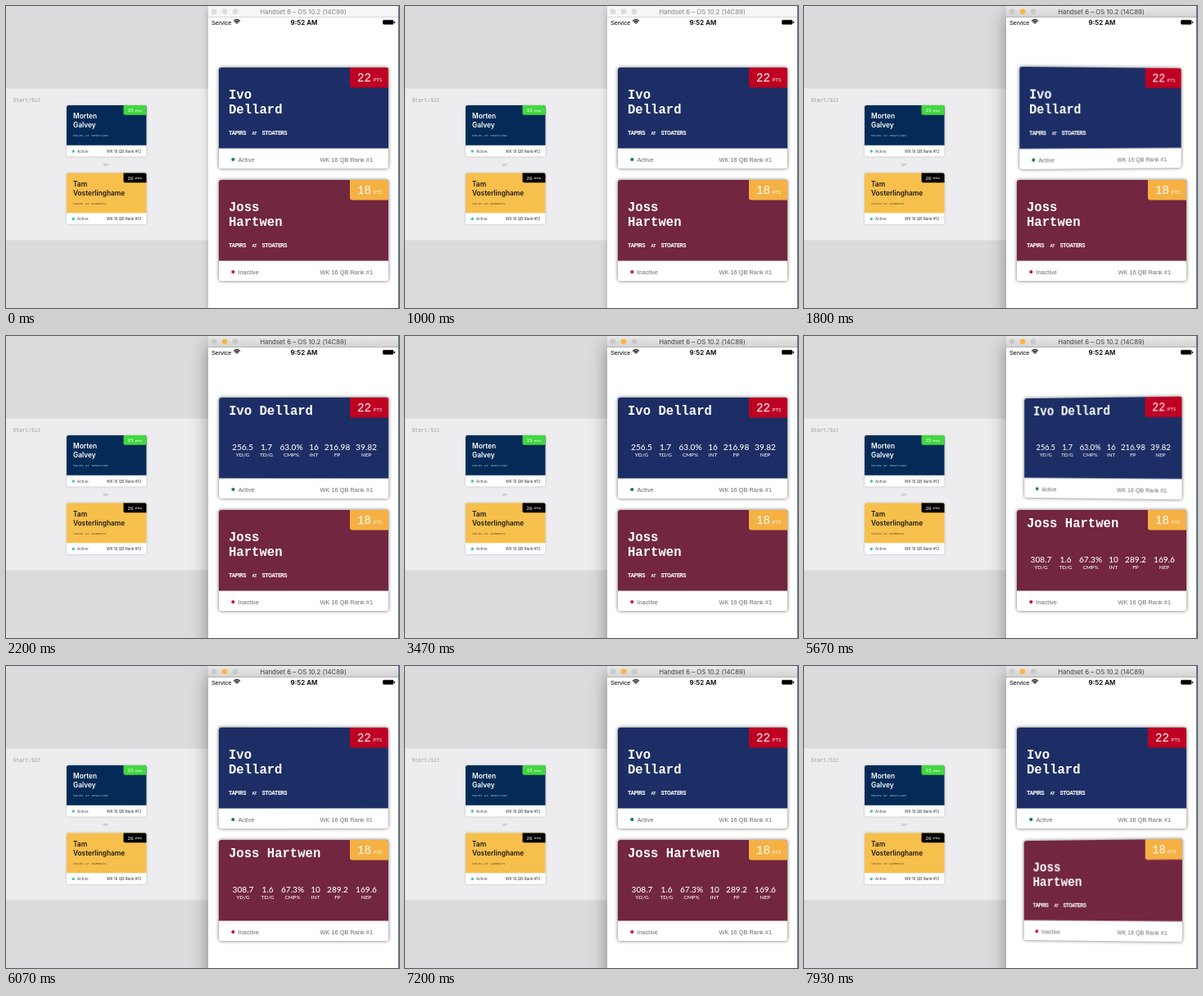
An HTML page that plays this animation: 480 by 368 pixels, repeating every 8 s.

```html
<!DOCTYPE html>
<html lang="en">
<head>
<meta charset="utf-8">
<title>Flipping player cards</title>
<style>
  html, body { margin: 0; width: 100%; height: 100%; overflow: hidden; background: #dbdadc; }
  #stage { position: absolute; left: 0; top: 0; width: 480px; height: 368px; overflow: hidden; }
  svg { position: absolute; left: 0; top: 0; display: block; overflow: visible; }
  text { white-space: pre; }
  .card { left: 259.6px; filter: drop-shadow(0 .8px 2px rgba(0, 0, 0, .6)); }
  .mini { filter: drop-shadow(0 .6px 1px rgba(0, 0, 0, .25)); }
  .mono { font-family: "Liberation Mono", monospace; }
  .sans { font-family: "Liberation Sans", sans-serif; }
  .lato { font-family: Lato, sans-serif; }
  .inter { font-family: Inter, sans-serif; }
  .match { font-family: Roboto, sans-serif; font-weight: 700; letter-spacing: -.5px; }
  #phone { position: absolute; left: 247px; top: 0; width: 232px; height: 380px; background: #fff; }
  #phone { box-shadow: 0 4px 9px rgba(0, 0, 0, .22); }
  #phone.active { box-shadow: 0 10px 20px rgba(0, 0, 0, .4); }
  #bar { height: 13px; background: #f6f6f6; border-bottom: 1px solid #d8d8d8; }
  .active #bar { background: linear-gradient(#e9e9e9, #d3d3d3); border-color: #b4b4b4; }
  .button { fill: #dcdcdc; }
  .active .button { fill: #cbcacb; }
  .active .minimize { fill: #fdb53e; }
  #title { fill: #858585; }
  .active #title { fill: #424242; }
</style>
</head>
<body>
<div id="stage"></div>
<script>
const LOOP = 8000, FOCUS_AT = 1690;
const stage = document.getElementById('stage');

const text = (x, y, size, fill, cls, str, extra = '') =>
  `<text x="${x}" y="${y}" font-size="${size}" fill="${fill}" class="${cls}" ${extra}>${str}</text>`;
const rect = (x, y, w, h, fill, r = 0) =>
  `<rect x="${x}" y="${y}" width="${w}" height="${h}" rx="${r}" fill="${fill}"/>`;
const dot = (x, y, r, fill, cls = '') =>
  `<circle cx="${x}" cy="${y}" r="${r}" fill="${fill}" class="${cls}"/>`;
const middle = 'text-anchor="middle"', end = 'text-anchor="end"';
const weight = w => `font-weight="${w}"`;

// Body with rounded top corners, and a badge in its top right corner
const roundTop = (w, h, r, fill) =>
  `<path fill="${fill}" d="M0 ${h}V${r}Q0 0 ${r} 0H${w - r}Q${w} 0 ${w} ${r}V${h}Z"/>`;
const corner = (right, w, h, r, fill) =>
  `<path fill="${fill}" d="M${right - w} 0H${right - r}Q${right} 0 ${right} ${r}V${h}H${right - w + r}Q${right - w} ${h} ${right - w} ${h - r}Z"/>`;

function miniCard(y, c) {
  return `<g class="mini" transform="translate(74 ${y})">` +
    rect(0, 0, 97.5, 62.5, '#fff', 2.5) + roundTop(97.5, 48.7, 2.5, c.color) +
    corner(97.5, 28, 11.7, 2, c.badge) +
    text(74.5, 8, 5.9, '#fff', 'mono', c.points) +
    text(84, 7.8, 4.3, '#fff', 'mono', 'PTS', weight(700)) +
    c.name.map((n, i) => text(8, 16.2 + i * 11.2, 8.3, c.ink, 'inter', n, weight(600))).join('') +
    text(8, 38, 4.2, c.ink, 'mono', c.match, 'opacity=".65"') +
    dot(8.3, 56, 1.7, '#3fc9a4') +
    text(13, 57.6, 4.6, '#444', 'inter', 'Active') +
    text(91.3, 57.6, 4.6, '#333', 'inter', 'WK 16 QB Rank #12', end) + '</g>';
}

const board = `<svg width="247" height="368">` +
  rect(0, 0, 247, 368, '#dbdadc') + rect(0, 100.5, 247, 185, '#edecee') +
  text(8.5, 117, 6.3, '#b5b4b7', 'mono', 'Start/Sit', weight(700)) +
  miniCard(121, { color: '#042b57', badge: '#42d840', ink: '#fff', points: 15,
    name: ['Morten', 'Galvey'], match: 'MOLES AT NEWTLING' }) +
  text(119, 195, 5.8, '#99989b', 'mono', 'or') +
  miniCard(203.5, { color: '#f7bf4c', badge: '#000', ink: '#1d1a14', points: 20,
    name: ['Tam', 'Vosterlinghame'], match: 'VOLES AT WOMBATS' }) + '</svg>';

const wifi = [1.4, 3.3, 5.2].map(r =>
  `<path d="M${-r * .75} ${-r * .75}A${r * 1.06} ${r * 1.06} 0 0 1 ${r * .75} ${-r * .75}" fill="none" stroke="#000" stroke-width="1.2"/>`).join('');

const phone = `<div id="phone"><div id="bar"></div><svg width="232" height="30">` +
  dot(7, 6.8, 3.3, '', 'button') + dot(20, 6.8, 3.3, '', 'button minimize') + dot(33, 6.8, 3.3, '', 'button') +
  `<text id="title" x="116" y="9.8" font-size="7.8" class="inter" ${middle}>Handset 6 – OS 10.2 (14C89)</text>` +
  text(4, 22.6, 7.3, '#000', 'sans', 'Service') +
  `<g transform="translate(35 22.2)">${wifi}</g>` +
  text(117, 22.8, 8, '#000', 'inter', '9:52 AM', `${middle} ${weight(600)}`) +
  `<rect x="213.5" y="17.3" width="12.6" height="5" rx="1" stroke="#000" stroke-width=".6"/>` +
  rect(227, 18.7, 1.1, 2.2, '#000', .5) + rect(232, 0, 1, 368, '#5b7a94') + '</svg></div>';

const labels = ['YD/G', 'TD/G', 'CMP%', 'INT', 'FP', 'NEP'];
const cards = [
  { y: 75, color: '#1c2e65', badge: '#be0023', points: 22, first: 'Ivo', last: 'Dellard',
    status: 'Active', light: '#0f7d3b', opens: 1769, closes: 5635,
    stats: ['256.5', '1.7', '63.0%', '16', '216.98', '39.82'], columns: [29, 58, 88.5, 116, 144.5, 180] },
  { y: 212, color: '#722640', badge: '#f6b144', points: 18, first: 'Joss', last: 'Hartwen',
    status: 'Inactive', light: '#c8102e', opens: 3730, closes: 7723,
    stats: ['308.7', '1.6', '67.3%', '10', '289.2', '169.6'], columns: [29.5, 59.5, 90, 118, 145, 180] },
];

function cardMarkup(c) {
  const name = (y, str) => text(12, y, 15.6, '#fff', 'mono', str, weight(700));
  const front = name(38, c.first) + name(56, c.last) +
    text(12, 81.8, 7, '#fff', 'match', 'TAPIRS') +
    text(40.5, 81.8, 5.2, '#fff', 'match', 'AT') +
    text(52.5, 81.8, 7, '#fff', 'match', 'STOATERS');
  const back = name(20.6, `${c.first} ${c.last}`) + c.columns.map((x, i) =>
    text(x, 63.8, 10.1, '#fff', 'lato', c.stats[i], `${middle} ${weight(500)}`) +
    text(x, 72.1, 6.4, '#fff', 'lato', labels[i], `${middle} ${weight(500)}`)).join('');
  return `<svg class="card" style="top:${c.y}px" width="207" height="123">` +
    rect(0, 0, 207, 123, '#fff', 3) + roundTop(207, 98.5, 3, c.color) +
    corner(207, 47, 24.5, 3, c.badge) +
    text(169, 17, 14.2, '#fff', 'mono', c.points) +
    text(188.5, 17, 6.4, '#fff', 'lato', 'PTS', 'opacity=".9"') +
    `<g class="front">${front}</g><g class="back">${back}</g>` +
    dot(17.3, 112, 2.1, c.light) +
    text(23.4, 114.7, 7.4, '#6b6b6b', 'sans', c.status) +
    text(188, 114.7, 7.4, '#6b6b6b', 'sans', 'WK 16 QB Rank #1', end) + '</svg>';
}

stage.innerHTML = board + phone + cards.map(cardMarkup).join('');
const phoneBox = document.getElementById('phone');
stage.querySelectorAll('.card').forEach((el, i) => Object.assign(cards[i], {
  el, front: el.querySelector('.front'), back: el.querySelector('.back'),
}));

// Underdamped spring from 0 to 1
function spring(ms) {
  if (ms <= 0) return 0;
  const t = ms / 1000, decay = 8, freq = Math.sqrt(230.2 - decay * decay);
  return 1 - Math.exp(-decay * t) * (Math.cos(freq * t) + decay / freq * Math.sin(freq * t));
}

function draw(now) {
  const t = now % LOOP;
  phoneBox.classList.toggle('active', t >= FOCUS_AT);
  for (const c of cards) {
    const angle = 180 * (spring(t - c.opens) - spring(t - c.closes));
    const flipped = angle > 90;
    c.front.style.display = flipped ? 'none' : '';
    c.back.style.display = flipped ? '' : 'none';
    const tilt = flipped ? angle - 180 : angle;
    c.el.style.transform = Math.abs(tilt) < .1 ? 'none' : `perspective(2000px) rotateY(${tilt}deg)`;
  }
}

const started = performance.now();
function tick() {
  draw(performance.now() - started);
  requestAnimationFrame(tick);
}
tick();
</script>
</body>
</html>
```
